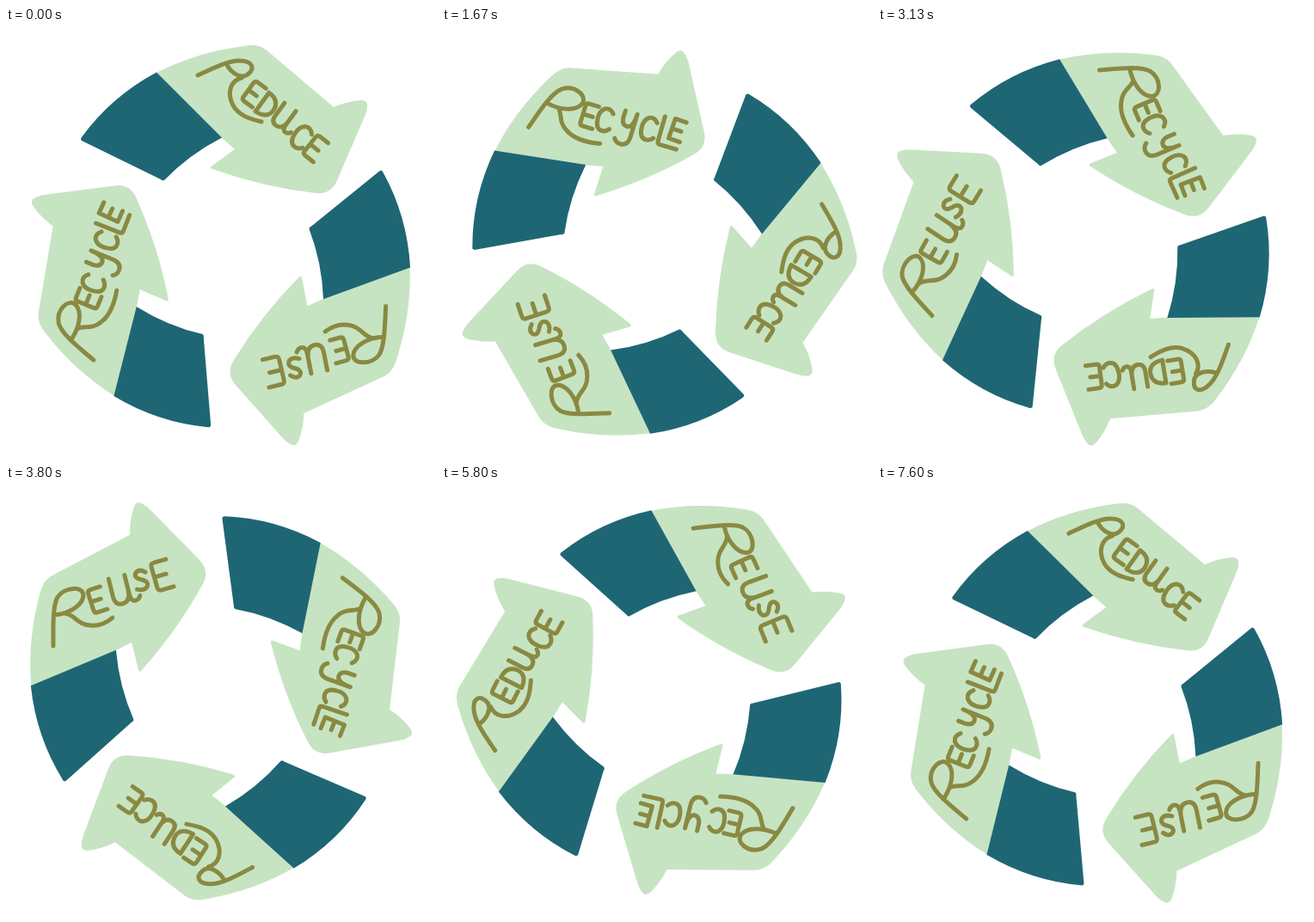
An HTML page for the animation above (7630 ms loop, 500 by 500 pixels).

```html
<!DOCTYPE html>
<html lang="en">
<head>
<meta charset="utf-8">
<title>Reduce, reuse, recycle</title>
<style>
  html, body { margin: 0; height: 100%; overflow: hidden; background: #fff; }
  svg { display: block; width: 100%; height: 100%; }
  .word { fill: none; stroke: #8a8942; stroke-linecap: round; stroke-linejoin: round; }
</style>
</head>
<body>
<svg viewBox="0 0 500 500" role="img" aria-label="Reduce, reuse, recycle">
  <defs>
    <g id="arrow">
      <path fill="#c6e4c2" d="M175 52Q222 28 277 21Q292 18 302 25L381 92Q397 85 413 84Q421 84 420 91Q420 96 417 103L385 177Q378 194 360 192Q299 185 240 164Q236 162 240 160L266 141L250 127Z"/>
      <path fill="#1f6675" d="M88 127Q122 80 175 51.500L251 127.500Q213 147 184 177Q182 178 180 176L88 131Q86 129 88 127Z"/>
    </g>
  </defs>
  <g id="wheel"></g>
</svg>
<script>
const wheel = document.getElementById('wheel');

// Letters sit on a baseline at 0 and are 30 units tall.
const glyphs = {
  E: 'M17-30H4Q0-30 0-26V-4Q0 0 4 0H17M0-15H13',
  e: 'M17-30H0V0H17M0-15H14',
  C: 'M18-25Q12-32 5-28Q-1-23 0-13Q1 1 10 1Q15 1 19-4',
  D: 'M0-30V0Q18-1 18-15Q17-30 0-30',
  U: 'M0-30V-10Q0 0 8 0Q17 0 18-12V-30V-8Q18 0 23 0Q27 0 29-4',
  Y: 'M0-30V-20Q1-11 8-11Q16-12 16-30V2Q15 13 6 13Q0 13-3 8',
  L: 'M0-30V-3Q0 0 3 0H21',
  S: 'M14-19Q8-25 3-21Q-1-16 7-12Q16-8 12-2Q7 2 0-2'
};

// turn: wheel angle at which the lettering coordinates apply
// letters: [glyph, x, y, angle, scale]
const words = [
  { turn: 0,
    initial: 'M223 55C240 47 258 38 271 38C287 38 290 47 281 54C273 60 262 52 257 43M274 58C262 61 256 74 264 90C271 102 284 106 297 109',
    letters: [['E', 274, 83, 36, .9], ['D', 290, 97, 36, .9], ['U', 308, 109, 36, .9],
              ['C', 329, 132, 37, .9], ['E', 345, 146, 38, .93]] },
  { turn: 177.2,
    initial: 'M55 186C55 165 54 140 60 129C68 117 90 116 90 127C90 137 76 148 57 150M68 148C80 149 82 161 98 162C108 163 117 159 124 153',
    letters: [['E', 103, 148, -18, .92], ['U', 127, 139, -14, 1.06],
              ['S', 153, 122, -14, 1], ['E', 177, 122, -16, 1.1]] },
  { turn: 40.6,
    initial: 'M49 257C46 238 40 210 46 198C54 184 74 183 75 195C75 206 62 217 45 222M58 217C66 218 70 229 84 229C98 230 111 222 122 213',
    letters: [['E', 90, 214, -27, .9], ['C', 105, 204, -27, .87], ['Y', 129, 189, -27, .9],
              ['C', 149, 176, -27, .87], ['L', 170, 167, -28, 1.1], ['e', 175, 153, -25, .8]] }
];

const stroke = (d, scale = 1, place = '') =>
  `<path d="${d}" stroke-width="${5 / scale}" transform="${place}"/>`;

const letter = ([glyph, x, y, angle, scale]) =>
  stroke(glyphs[glyph], scale, `translate(${x} ${y}) rotate(${angle}) scale(${scale})`);

// Each arrow is placed by its tail corner: [x, y, angle]
const arrows = [[87, 129, 0], [437, 166, 115], [237, 464, 239.2]];

wheel.innerHTML =
  arrows.map(([x, y, angle]) =>
    `<use href="#arrow" transform="translate(${x} ${y}) rotate(${angle}) translate(-87 -129)"/>`).join('') +
  words.map(({ turn, initial, letters }) =>
    `<g class="word" transform="rotate(${-turn} 250 250)">${stroke(initial)}${letters.map(letter).join('')}</g>`).join('');

const LOOP = 7630, STEP = 2560;

// Three eased turns of 120 degrees, 25 poses a second shown on a 30 Hz grid.
function angleAt(time) {
  const tick = Math.floor(time * .03 + .2);
  const turns = Math.floor(tick * 5 / 6) * 40 / STEP;
  const whole = Math.floor(turns), u = turns - whole;
  return 120 * (whole + u * u * (3 - 2 * u));
}

function draw() {
  wheel.setAttribute('transform', `rotate(${angleAt(performance.now() % LOOP)} 250 250)`);
  requestAnimationFrame(draw);
}
draw();
</script>
</body>
</html>
```
